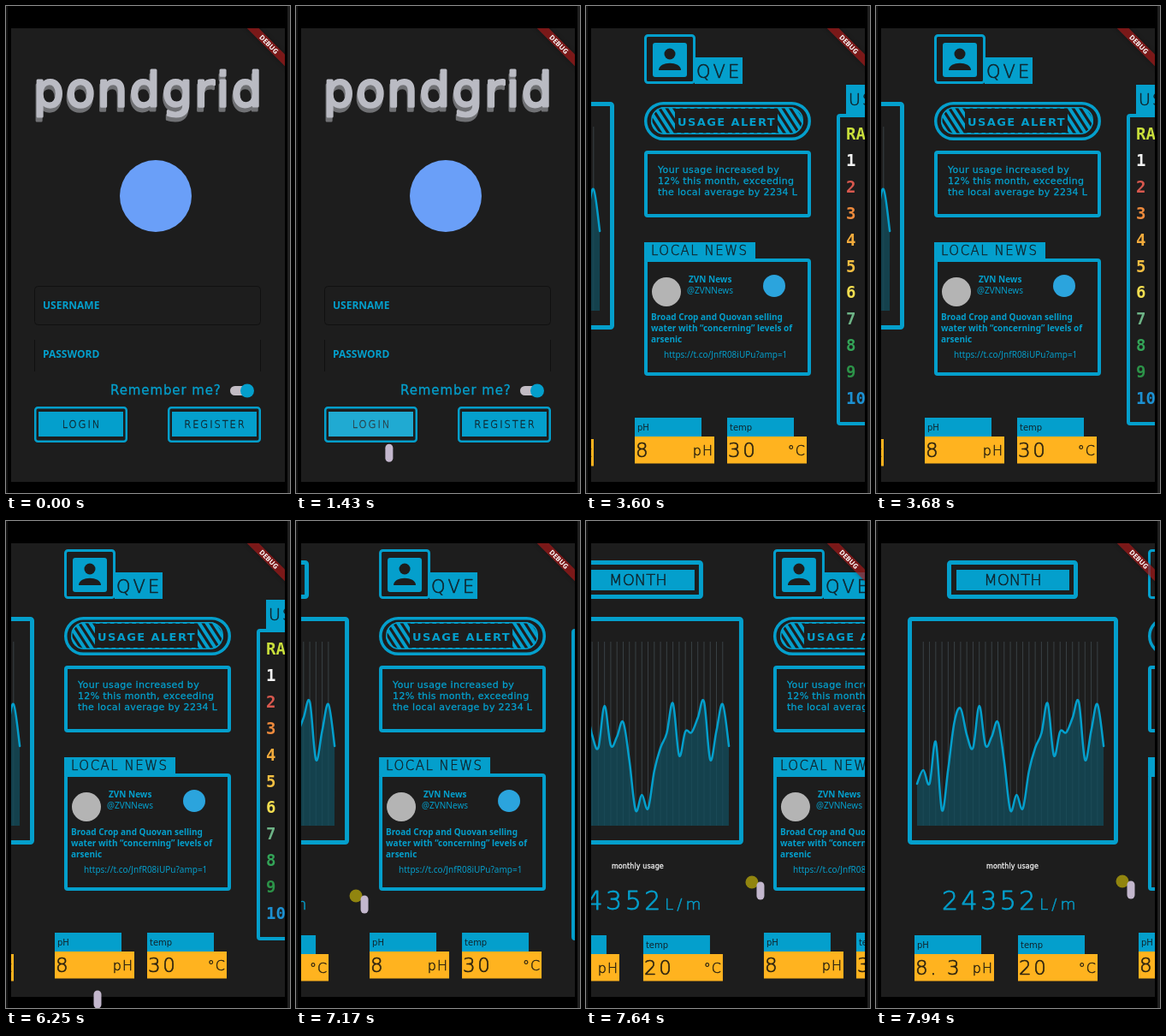
Animation, 332 px wide and 569 px high, one loop 8 s. Source, as an HTML page with a canvas:

```html
<!DOCTYPE html>
<html lang="en">
<head>
<meta charset="utf-8">
<title>Water usage app</title>
<style>
html, body { margin: 0; width: 100%; height: 100%; overflow: hidden; background: #000; }
canvas { display: block; width: 332px; height: 569px; }
</style>
</head>
<body>
<canvas id="stage" width="332" height="569"></canvas>
<script>
const ctx = document.getElementById('stage').getContext('2d');
const LOOP = 8000, STEP = 76.6;
const BG = '#1d1d1d', CYAN = '#049fcc', DARK = '#10242c', AMBER = '#ffb31f';
const WIDE = '"DejaVu Sans", sans-serif';
const PLAIN = '"Noto Sans", "Open Sans", sans-serif';

// Each key is [time, value, value, ...]
function track(keys, t) {
  if (t <= keys[0][0]) return keys[0].slice(1);
  for (let i = 1; i < keys.length; i++) {
    const a = keys[i - 1], b = keys[i];
    if (t <= b[0]) {
      const k = (t - a[0]) / (b[0] - a[0]);
      return a.slice(1).map((v, j) => v + (b[j + 1] - v) * k);
    }
  }
  return keys[keys.length - 1].slice(1);
}

const stepped = (t, start) => start + Math.floor((t - start) / STEP + 1e-6) * STEP;

function rect(x, y, w, h, color) {
  ctx.fillStyle = color;
  ctx.fillRect(x, y, w, h);
}

// Outline whose outer edge is the given box
function frame(x, y, w, h, line, r, color = CYAN) {
  ctx.beginPath();
  ctx.roundRect(x + line / 2, y + line / 2, w - line, h - line, r);
  ctx.strokeStyle = color;
  ctx.lineWidth = line;
  ctx.stroke();
}

function disc(x, y, r, color) {
  ctx.beginPath();
  ctx.arc(x, y, r, 0, Math.PI * 2);
  ctx.fillStyle = color;
  ctx.fill();
}

function text(str, x, y, font, color, spacing = 0, align = 'left') {
  ctx.font = font;
  ctx.letterSpacing = spacing + 'px';
  ctx.textAlign = align;
  ctx.fillStyle = color;
  ctx.fillText(str, x, y);
}

const wide = px => `${px}px ${WIDE}`;

// Text thickened by an outline of its own colour
function inked(str, x, y, font, color, spacing, align, ink) {
  text(str, x, y, font, color, spacing, align);
  ctx.strokeStyle = color;
  ctx.lineWidth = ink;
  ctx.lineJoin = 'round';
  ctx.strokeText(str, x, y);
}

const thin = (str, x, y, px, color, spacing = 0, align = 'left') =>
  inked(str, x, y, `200 ${px}px ${WIDE}`, color, spacing, align, px * 0.028);

function title(str, x, y) {
  inked(str, x - 1, y + 5, wide(56), '#707174', 2.4, 'left', 3);
  inked(str, x, y, wide(56), '#babbc3', 2.4, 'left', 3);
}

function button(label, x, w, spacing) {
  frame(x, 468, w, 42, 2.5, 3);
  rect(x + 5, 474, w - 10, 29, CYAN);
  thin(label, x + w / 2 + spacing / 2, 493, 11.5, DARK, spacing, 'center');
}

function login(t) {
  title('pondgrid', 32, 117);
  disc(175, 222, 42, '#6a9ff8');

  frame(33, 327, 265, 46, 1, 4, '#101010');
  rect(33, 390, 1, 37, '#101010');
  rect(297, 390, 1, 37, '#101010');
  text('USERNAME', 43, 354, `bold 12px ${PLAIN}`, CYAN);
  text('PASSWORD', 43, 411, `bold 12px ${PLAIN}`, CYAN);

  inked('Remember me?', 122, 454, wide(15), CYAN, 0.9, 'left', 0.3);
  ctx.beginPath();
  ctx.roundRect(262, 444, 26, 11, 5.5);
  ctx.fillStyle = '#c2bcc4';
  ctx.fill();
  disc(282, 449.5, 8, CYAN);

  button('LOGIN', 33, 109, 1.9);
  button('REGISTER', 189, 109, 1.9);

  const press = stepped(t, 1130) - 1130;
  if (press >= 0 && press < 520) {
    ctx.save();
    ctx.beginPath();
    ctx.rect(38, 474, 99, 29);
    ctx.clip();
    ctx.globalAlpha = 0.2 * (1 - press / 520);
    disc(92, 484, 12 + press / 5, '#fff');
    ctx.restore();
  }
}

function loading() {
  text('Loading', 6, 61.5, '600 37.1px "Noto Sans Mono", "DejaVu Sans Mono", monospace', '#d60404');
  rect(6, 62.5, 156.5, 2, '#e6e60a');
  rect(6, 68, 156.5, 2, '#e6e60a');
}

function tile(x, y, label, value, unit) {
  rect(x, y, 78, 23, CYAN);
  text(label, x + 3, y + 15, wide(10), DARK);
  rect(x, y + 22, 93, 31.5, AMBER);
  thin(value, x + 1, y + 46, 23, '#2a2210', 2.6);
  thin(unit, x + 92, y + 44, 16, '#2a2210', 1, 'right');
}

const usage = [307, 291, 307, 258, 338, 290, 235, 219, 250, 265, 216, 262, 252, 235, 280, 338,
  320, 336, 292, 265, 248, 213, 274, 246, 247, 230, 211, 279, 245, 214, 263];
const points = usage.map((y, i) => [48 + i * 7.27, y]);

function traceUsage() {
  const at = i => points[Math.max(0, Math.min(points.length - 1, i))];
  const slope = (i, axis) => (at(i + 1)[axis] - at(i - 1)[axis]) * 0.175;
  ctx.beginPath();
  ctx.moveTo(...points[0]);
  for (let i = 0; i < points.length - 1; i++) {
    const a = at(i), b = at(i + 1);
    ctx.bezierCurveTo(a[0] + slope(i, 0), a[1] + slope(i, 1),
      b[0] - slope(i + 1, 0), b[1] - slope(i + 1, 1), ...b);
  }
}

function monthPage() {
  frame(83, 46, 153, 45, 5, 2);
  rect(94, 57, 132, 24, CYAN);
  thin('MONTH', 160, 75, 18, DARK, 0, 'center');

  frame(37, 112, 246, 266, 5, 2);
  for (let i = 1; i < points.length - 1; i++) rect(points[i][0] - 0.5, 141, 1, 215, '#394145');
  traceUsage();
  ctx.lineTo(266, 356);
  ctx.lineTo(48, 356);
  ctx.fillStyle = 'rgba(18, 76, 91, 0.78)';
  ctx.fill();
  traceUsage();
  ctx.strokeStyle = CYAN;
  ctx.lineWidth = 2.5;
  ctx.lineCap = ctx.lineJoin = 'round';
  ctx.stroke();

  inked('monthly usage', 129, 406, wide(8), '#f0f0f0', 0.1, 'left', 0.3);
  thin('24352', 77, 454, 30, CYAN, 3.5);
  thin('L/m', 191, 454, 18.5, CYAN, 4);
  tile(45, 484, 'pH', '8. 3', 'pH');
  tile(166, 484, 'temp', '20', '°C');
}

function avatar() {
  frame(68, 33, 60, 58, 3, 3);
  ctx.beginPath();
  ctx.roundRect(78, 43, 40, 40, 3);
  ctx.fillStyle = CYAN;
  ctx.fill();
  disc(98, 56, 6.5, BG);
  ctx.beginPath();
  ctx.moveTo(85, 75);
  ctx.bezierCurveTo(85, 64, 111, 64, 111, 75);
  ctx.closePath();
  ctx.fill();
}

function alertPill() {
  frame(68, 112, 195, 45, 3.5, 21);
  ctx.save();
  ctx.beginPath();
  ctx.roundRect(76, 118, 178, 32, 16);
  ctx.clip();
  ctx.strokeStyle = CYAN;
  ctx.lineWidth = 4;
  ctx.lineCap = 'butt';
  for (let x = 46; x < 260; x += 8.5) {
    ctx.beginPath();
    ctx.moveTo(x, 117);
    ctx.lineTo(x + 22, 151);
    ctx.stroke();
  }
  rect(104, 120, 120, 28, BG);
  ctx.restore();
  frame(76, 118, 178, 32, 1.5, 15);
  text('USAGE ALERT', 107, 140, `bold 13px ${WIDE}`, CYAN, 1.4);
}

function newsPage() {
  avatar();
  rect(127, 60, 56, 31, CYAN);
  thin('QVE', 129, 84, 21, DARK, 3);
  alertPill();

  frame(68, 169, 195, 78, 4, 2);
  ['Your usage increased by', '12% this month, exceeding', 'the local average by 2234 L']
    .forEach((line, i) => inked(line, 84, 195 + i * 13, wide(11), CYAN, 0.35, 'left', 0.3));

  rect(68, 276, 130, 22, CYAN);
  thin('LOCAL NEWS', 76, 291, 15, DARK, 1.5);
  frame(68, 295, 195, 137, 4, 2);
  disc(94, 334, 17, '#b4b4b4');
  disc(220, 327, 13, '#2ba4dd');
  const bold = `bold 10px ${PLAIN}`, regular = `10px ${PLAIN}`;
  text('ZVN News', 120, 323, bold, CYAN);
  text('@ZVNNews', 118, 336, regular, CYAN);
  ['Broad Crop and Quovan selling', 'water with “concerning” levels of', 'arsenic']
    .forEach((line, i) => text(line, 76, 367 + i * 13, bold, CYAN));
  text('https://t.co/JnfR08iUPu?amp=1', 91, 411, regular, CYAN);

  tile(57, 481, 'pH', '8', 'pH');
  tile(165, 481, 'temp', '30', '°C');
}

const rankColors = ['#c9df3b', '#f4f4f4', '#d8584e', '#ee8a3c', '#f2ab3c', '#f4bf42',
  '#f3de50', '#6db386', '#33a457', '#2c9348', '#1c91d2'];

function rankPage() {
  rect(304, 92, 130, 36, CYAN);
  thin('USAGE', 307, 116, 19, DARK, 2);
  frame(293, 126, 195, 364, 4, 2);
  rankColors.forEach((color, i) =>
    text(i ? String(i) : 'RANK', 304, 156 + i * 30.9, 'bold 19px "DejaVu Sans Mono", monospace', color));
}

function home(shift) {
  for (const [page, x] of [[monthPage, shift - 250], [newsPage, shift], [rankPage, shift]]) {
    ctx.save();
    ctx.translate(x, 0);
    page();
    ctx.restore();
  }
}

// Corner band: 45 degrees, measured outward from the top right corner
function ribbon() {
  ctx.save();
  ctx.translate(326, 26);
  ctx.rotate(Math.PI / 4);
  ctx.shadowColor = 'rgba(0, 0, 0, 0.5)';
  ctx.shadowBlur = 5;
  rect(-40, 21.5, 80, 9.8, 'rgba(183, 28, 28, 0.63)');
  ctx.shadowColor = 'transparent';
  text('DEBUG', 0, 29.3, `900 8px ${PLAIN}`, '#fff', 0, 'center');
  ctx.restore();
}

function pointer(x, y, pressed) {
  if (pressed) disc(x - 10, y - 10, 7.5, '#91850f');
  ctx.beginPath();
  ctx.roundRect(x - 4.5, y - 10.5, 9, 21, 4.5);
  ctx.fillStyle = '#c3b7cd';
  ctx.fill();
}

const clickPath = [[500, 146, 566], [700, 128, 528], [960, 102, 494], [1285, 102, 494],
  [1480, 112, 535], [1665, 120, 584]];
const dragPath = [[6250, 107, 559], [6600, 62, 500], [6850, 37, 458], [7010, 48, 448],
  [7092, 61, 448], [7169, 80, 448], [7629, 204, 432], [7858, 283, 431], [7935, 298, 431]];
const pageShift = [[7010, 0], [7092, 12], [7169, 29], [7629, 151], [7858, 235], [7935, 250]];

function draw(t) {
  const first = stepped(t, 500), second = stepped(t, 6250);
  const isLoading = t >= 2290 && t < 3600;
  rect(0, 0, 332, 569, '#000');
  rect(0, 0, 2, 569, '#141414');
  rect(329, 0, 3, 569, '#202020');

  ctx.save();
  ctx.beginPath();
  ctx.rect(6, 26, 320, 530);
  ctx.clip();
  if (!isLoading) rect(6, 26, 320, 530, BG);
  if (t < 2290) login(t);
  else if (isLoading) loading();
  else home(track(pageShift, second)[0]);
  ribbon();
  ctx.restore();

  if (t >= 500 && t < 1680) pointer(...track(clickPath, first), t >= 1130 && t < 1290);
  if (t >= 6250) pointer(...track(dragPath, second), t >= 7090);
}

function tick(now) {
  draw(now % LOOP);
  requestAnimationFrame(tick);
}
draw(0);
requestAnimationFrame(tick);
</script>
</body>
</html>
```
